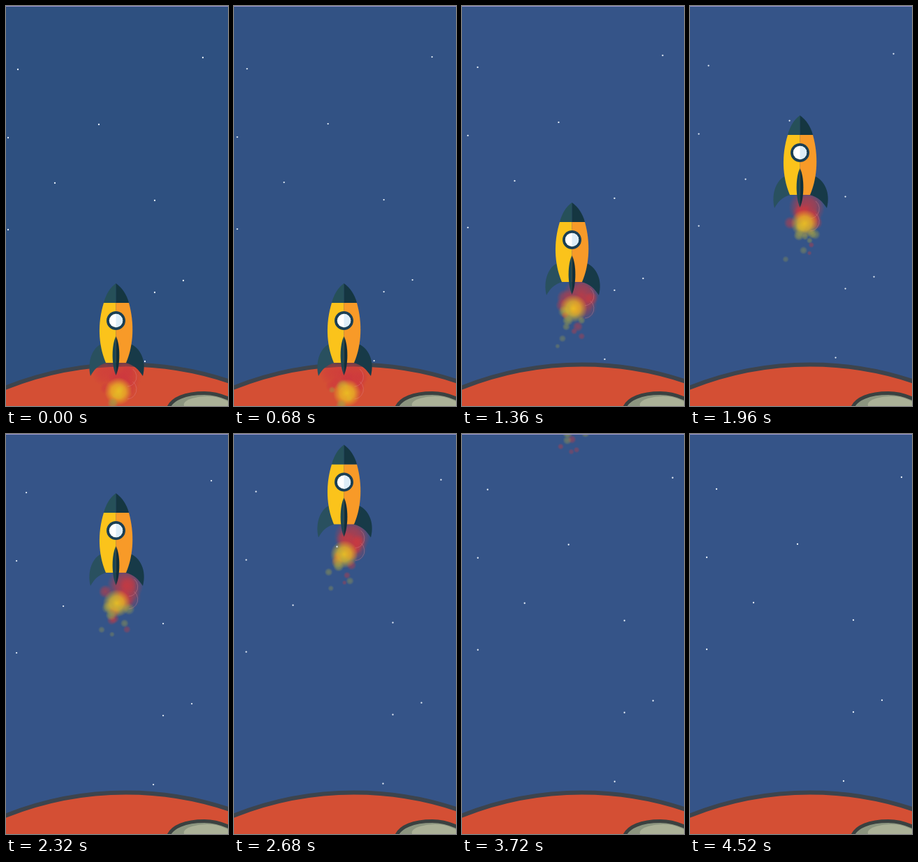
Recreate the animation shown at these times as an HTML page with a canvas. Size 318x574 px, loop 4640 ms.

```html
<!DOCTYPE html>
<html lang="en">
<head>
<meta charset="utf-8">
<title>Rocket launch</title>
<style>
html, body { margin: 0; width: 100%; height: 100%; overflow: hidden; background: #355488; }
canvas { display: block; }
</style>
</head>
<body>
<canvas id="stage" width="318" height="574"></canvas>
<script>
const W = 318, H = 574, LOOP = 4640, STEP = 40, LAST = 4520;
const ctx = document.getElementById('stage').getContext('2d');
const STARS = [[17, 91], [282, 74], [133, 170], [3, 189], [70, 254],
  [213, 279], [3, 321], [254, 394], [213, 411], [199, 510]];
const RED = '205,56,62', YELLOW = '236,192,34', OLIVE = '160,160,70';

const mix = (a, b, k) => a + (b - a) * k;
const rand = n => { const s = Math.sin(n * 127.1 + 11.7) * 43758.5453; return s - Math.floor(s); };

function shape(d, fill, stroke, width) {
  const p = new Path2D(d);
  if (fill) { ctx.fillStyle = fill; ctx.fill(p); }
  if (stroke) { ctx.strokeStyle = stroke; ctx.lineWidth = width; ctx.stroke(p); }
}

function disc(x, y, r, fill) {
  ctx.beginPath();
  ctx.arc(x, y, r, 0, 7);
  ctx.fillStyle = fill;
  ctx.fill();
}

function glow(x, y, r, rgb, alpha) {
  const g = ctx.createRadialGradient(x, y, 0, x, y, r);
  g.addColorStop(0, `rgba(${rgb},${alpha})`);
  g.addColorStop(0.5, `rgba(${rgb},${alpha * 0.75})`);
  g.addColorStop(1, `rgba(${rgb},0)`);
  disc(x, y, r, g);
}

// Height climbed: soft start, then a slowly fading speed.
function climb(t) {
  let d = t - 829;
  const soft = 80;
  if (d < -soft) return 0;
  if (d < soft) d = (d + soft) ** 2 / (4 * soft);
  return 0.2233 * d - 9e-6 * d * d;
}

function planet() {
  ctx.beginPath();
  ctx.arc(172, 980, 465.5, 0, 7);
  ctx.fillStyle = '#d44f34';
  ctx.fill();
  ctx.strokeStyle = '#3d444d';
  ctx.lineWidth = 6;
  ctx.stroke();
  const rim = 'M232 578C237 563 258 555.5 284 555.5C300 555.5 312 560 322 565V582H232Z';
  shape(rim, '#8c957f');
  shape('M258 578C248 569 262 561 288 560C304 560 314 565 322 570V582H258Z', '#abb197');
  shape(rim, null, '#3a4140', 5);
}

function flame(t, air) {
  const reach = mix(36, 74, air);
  const sway = Math.sin(t / 170);
  glow(169 + 2 * sway, 132, 26, RED, 0.8);
  glow(171 + 3 * sway, 149, 20, RED, 0.5);
  glow(142, 128, 20, RED, 0.6 * (1 - air));

  const count = 14, life = 640;
  for (let i = 0; i < count; i++) {
    const phase = t / life + i / count;
    const u = phase % 1;
    const seed = i * 31 + Math.floor(phase) * 7;
    const x = mix(165, 153, u) + (rand(seed) - 0.5) * 44;
    const y = 126 + u * reach + rand(seed + 3) * 8;
    const r = mix(11, 4, u) * mix(0.75, 1.2, rand(seed + 5));
    const rgb = u < 0.4 || rand(seed + 9) < 0.5 ? RED : OLIVE;
    glow(x, y, r, rgb, 0.6 * (1 - u * u * 0.4));
  }

  // Thin bright edges on the red puffs
  ctx.strokeStyle = 'rgba(225,140,150,.35)';
  ctx.lineWidth = 1;
  for (const y of [134, 152]) {
    ctx.beginPath();
    ctx.arc(173 + 2 * sway, y, 14, -0.9, 1.5);
    ctx.stroke();
  }

  const x = 161 + 4 * Math.sin(t / 230), y = 155 + 3 * Math.sin(t / 310);
  glow(x, y, 20, YELLOW, 0.95);
  glow(x - 8, y + 17, 8, OLIVE, 0.7);
}

function rocket() {
  shape('M137 87C124 92 116 112 121 133C126 124 132 117 144 114Z', '#29505f');
  shape('M178 87C192 92 202 111 196 133C190 124 184 117 171 114Z', '#173a48');
  shape('M140 28H157.5V114H143C132 88 131 57 140 28Z', '#fbc31b');
  shape('M157.5 28H176C184 57 183 88 172 114H157.5Z', '#f89a28');
  shape('M157.5 0C149 6 143 16 140 28H157.5Z', '#265059');
  shape('M157.5 0C166 6 173 16 176 28H157.5Z', '#153641');
  disc(157.5, 53.5, 13.5, '#1a3f55');
  disc(157.5, 53.5, 9.7, '#ffffff');
  shape('M157.5 43.8A9.7 9.7 0 0 1 157.5 63.2Z', '#deedf7');
  shape('M157.5 76C151 88 151 118 157.5 132Z', '#1c4552');
  shape('M157.5 76C164 88 164 118 157.5 132Z', '#102f3b');
}

function draw(t) {
  const k = Math.min(1, t / 1360);
  ctx.fillStyle = `rgb(${mix(46, 53, k)},${mix(80, 84, k)},${mix(128, 136, k)})`;
  ctx.fillRect(0, 0, W, H);
  planet();

  const up = climb(t), top = 398 - up;
  const visible = top > -220;
  if (visible) {
    ctx.save();
    ctx.translate(0, top);
    flame(t, Math.min(1, up / 60));
    ctx.restore();
  }

  const drift = Math.sin(Math.PI / 2 * (t / LAST) ** 0.9) ** 2;
  for (const [x, y] of STARS)
    disc(x + 21 * drift, y - 12 * drift, 1.15, '#e9f1fa');

  if (visible) {
    ctx.save();
    ctx.translate(0, top);
    rocket();
    ctx.restore();
  }
  ctx.fillStyle = '#9a94cc';
  ctx.fillRect(0, 0, W, 1);
}

const start = performance.now();
function tick() {
  const t = (performance.now() - start) % LOOP;
  draw(Math.min(LAST, Math.floor(t / STEP) * STEP));
  requestAnimationFrame(tick);
}
tick();
</script>
</body>
</html>
```
